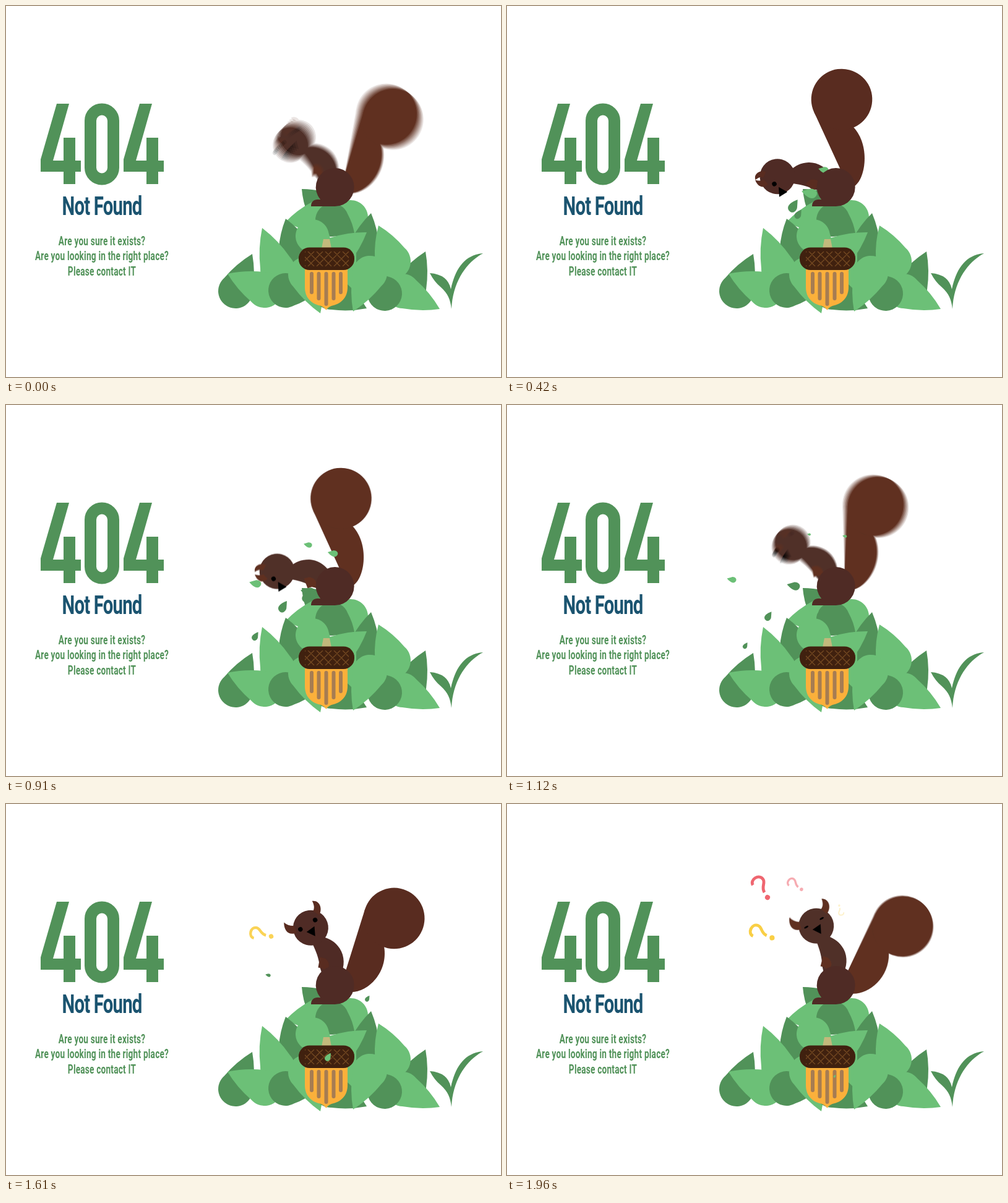
Animation of 800x600 px, one loop 2.03 s. Source, as an HTML page with a canvas:

```html
<!DOCTYPE html>
<html lang="en">
<head>
<meta charset="utf-8">
<title>404 Not Found</title>
<style>
html, body { margin: 0; width: 100%; height: 100%; overflow: hidden; background: #fff; }
svg, canvas { position: absolute; left: 0; top: 0; width: 800px; height: 600px; }
text { font-family: Roboto, "Liberation Sans", sans-serif; text-anchor: middle; }
.title { font-size: 42px; font-weight: 700; letter-spacing: -1.2px; fill: #1b5470; }
.line { font-size: 19.5px; font-weight: 600; letter-spacing: .3px; fill: #519259; }
</style>
</head>
<body>
<svg viewBox="0 0 800 600">
  <defs>
    <path id="four" d="M82 158H102L76 250H93V213H112V250H121V268H112V288H93V268H56V248Z"/>
    <clipPath id="weave"><rect x="483" y="397" width="71" height="24"/></clipPath>
  </defs>

  <g fill="#519259" role="img" aria-label="404">
    <use href="#four"/>
    <use href="#four" x="134"/>
    <rect x="136.5" y="167" width="37" height="113" rx="18.5" fill="none" stroke="#519259" stroke-width="19"/>
  </g>
  <g transform="translate(155 0) scale(.7 1)">
    <text class="title" y="338">Not Found</text>
    <text class="line" y="387">Are you sure it exists?</text>
    <text class="line" y="411.5">Are you looking in the right place?</text>
    <text class="line" y="436">Please contact IT</text>
  </g>

  <g id="pile"></g>

  <!-- acorn -->
  <path fill="#c2b97c" d="M513 377H523L526 392H510Z"/>
  <path fill="#fbb03b" d="M483 426H552V455C552 472 541 482 526 485Q519 488 517.5 492Q515 488 509 485C494 482 483 472 483 455Z"/>
  <path stroke="#a67c52" stroke-width="6" stroke-linecap="round" d="M494 433V463M505.5 433V473M517.5 433V482M529.5 433V473M541 433V463"/>
  <rect x="473" y="390.5" width="90" height="36.5" rx="17.5" fill="#40210f"/>
  <path id="hatch" clip-path="url(#weave)" stroke="#754a22" stroke-width="1.3"/>

  <path fill="#519259" d="M720 490C718 474 714 465 703 455Q692 446 685 432Q714 434 719 458C726 424 742 402 771 400C746 413 722 444 720 490Z"/>
</svg>
<canvas id="stage" width="800" height="600"></canvas>

<script>
const FRAME = 70, COUNT = 29, BLUR = 8, SHUTTER = 0.4;
const BODY = '#4f2b25', FUR = '#592c20', DARK = '#519259', LIGHT = '#6cc077';
const YELLOW = '#f9cf45', RED = '#ef6670';
const HIP = [531, 290], TAIL_ROOT = [540, 280], PAW = [490, 302];

const rad = deg => deg * Math.PI / 180;
const mix = (a, b, k) => a + (b - a) * k;
const clamp = v => Math.max(0, Math.min(1, v));
const span = (t, from, length) => clamp((t - from) / length);
const smooth = u => u * u * (3 - 2 * u);
const easeOut = (u, power) => 1 - (1 - u) ** power;

// a pile leaf: a round end and two slightly bowed sides meeting in a tip
function leafPath(tipX, tipY, x, y, r = 28) {
  const turn = Math.atan2(tipY - y, tipX - x);
  const open = Math.acos(r / Math.hypot(tipX - x, tipY - y));
  const touch = side => [x + r * Math.cos(turn + side * open), y + r * Math.sin(turn + side * open)];
  const bow = side => {
    const [px, py] = touch(side), out = turn + side * open, len = Math.hypot(tipX - px, tipY - py);
    return [(px + tipX) / 2 + .08 * len * Math.cos(out), (py + tipY) / 2 + .08 * len * Math.sin(out)];
  };
  return `M${tipX} ${tipY}Q${bow(1)} ${touch(1)}A${r} ${r} 0 1 1 ${touch(-1)}Q${bow(-1)} ${tipX} ${tipY}Z`;
}

const pile = [];
const grow = (color, ...leaf) => pile.push(`<path fill="${color}" d="${leafPath(...leaf)}"/>`);
grow(DARK, 478, 296, 515, 330);
grow(LIGHT, 452, 349, 510, 340);
grow(LIGHT, 560, 400, 557, 342);
grow(DARK, 563, 367, 527, 346, 27);
grow(DARK, 452, 344, 468, 400);
grow(DARK, 590, 335, 578, 395, 26);
grow(LIGHT, 530, 420, 495, 372, 27);
grow(LIGHT, 583, 366, 530, 402);
pile.push(`<path fill="${LIGHT}" d="M490 400H566V458H490Z"/>`);
grow(DARK, 398, 401, 371, 461);
grow(LIGHT, 414, 359, 439, 426);
grow(LIGHT, 358, 433, 418, 459, 29);
grow(DARK, 500, 465, 452, 460);
grow(LIGHT, 508, 497, 484, 434);
grow(DARK, 583, 489, 525, 463);
grow(DARK, 678, 397, 651, 459);
grow(LIGHT, 701, 490, 641, 461);
grow(LIGHT, 602, 355, 625, 413, 29);
grow(DARK, 578, 430, 612, 465);
grow(LIGHT, 561, 494, 588, 432);
document.getElementById('pile').innerHTML = pile.join('');

let hatch = '';
for (let x = 460; x < 570; x += 14) hatch += `M${x} 397l24 24M${x + 10} 397l-24 24`;
document.getElementById('hatch').setAttribute('d', hatch);

// dive into the leaves, dig, rise again, then slowly lean back
function pose(t) {
  const u = span(t, -1, 4), rise = smooth(span(t, 12.6, 5.6)), lean = span(t, 18, 10);
  const dive = easeOut(u, 2.3);
  const dig = dive * (1 - rise) * (1 - Math.cos(1.346 * (t - 6)));
  return {
    head: 108.4 + 63 * dive - 54.4 * rise - 8.6 * lean ** 1.2 - 2 * dig,
    tail: 38.8 + 50.7 * easeOut(u, 1.3) - 41.5 * rise - 9.2 * lean ** 4,
    paw: 12 * dig,
    eyes: clamp(.35 + (28 - t) * .25)
  };
}

// leaves thrown from the paws: colour, birth, life, direction, reach
const flying = [
  [LIGHT, 8, 14, 189, 172],
  [DARK, 9, 14, 149, 117],
  [DARK, 3.5, 17, 140, 155],
  [DARK, 3.5, 5, 118, 60],
  [DARK, 13, 12, 201, 75],
  [DARK, 12, 4, 110, 25],
  [LIGHT, 6, 11, 269, 95],
  [LIGHT, 4, 4, 301, 65],
  [LIGHT, 9, 8, 302, 110],
  [DARK, 14, 12, 8, 107],
  [LIGHT, 14, 15, 74, 146]
];

// question marks: colour, birth, resting place, turn, size
const marks = [
  [YELLOW, 19.5, 411, 209, -67, 1.05],
  [RED, 23, 411, 135, -32, 1.05],
  [RED, 24, 465, 130, -50, .75],
  [YELLOW, 25.5, 537, 168, 195, .6]
];

const shape = d => new Path2D(d);
const TORSO = shape('M492 229C498 240 503 250 506 266L516 292L540 275C546 262 545 245 536 233C528 223 520 219 508 216Z');
const ARM = shape('M505 249L514 251C522 257 522 266 516 272L510 267L503 266Z');
const HAUNCH = shape('M493 324C493 315 499 312 508 313A31 31 0 1 1 531 324Z');
const EAR_L = shape('M-43 -15Q-37 -8 -27 -7L-24 5C-38 9 -45 -1 -43 -15Z');
const EAR_R = shape('M9 -44C22 -44 25 -28 17 -19L8 -27C12 -32 11 -38 9 -44Z');
const DROP = shape('M.6 -.22C.2 -.38 -.5 -.5 -.5 .05C-.5 .42 0 .45 .2 .2Q.4 0 .6 -.22Z');
const HOOK = shape('M-9 -10C-9 -20 9 -20 9 -9C9 -2 0 -1 0 9');

function layer() {
  const c = document.createElement('canvas');
  c.width = 800; c.height = 600;
  return c.getContext('2d');
}
const stage = document.getElementById('stage').getContext('2d');
const sample = layer(), smear = layer();

function put(c, path, color) { c.fillStyle = color; c.fill(path); }
function disc(c, x, y, r, color, squash = 1) {
  c.fillStyle = color;
  c.beginPath(); c.ellipse(x, y, r, r * squash, rad(-30), 0, 7); c.fill();
}
function turned(c, [x, y], deg, draw) {
  c.save();
  c.translate(x, y); c.rotate(rad(deg)); c.translate(-x, -y);
  draw();
  c.restore();
}
// draws in a local frame placed at x, y
function placed(c, x, y, deg, size, draw) {
  c.save();
  c.translate(x, y); c.rotate(rad(deg)); c.scale(size, size);
  draw();
  c.restore();
}

function drawHead(c, angle, eyes) {
  const q = clamp((angle - 108.4) / 63), e = smooth(q), bow = Math.sin(Math.PI * q) ** 2;
  const reach = mix(98, 95, q), a = rad(angle);
  const face = (x0, y0, x1, y1) => [mix(x0, x1, e) - 14 * bow, mix(y0, y1, e) + 6 * bow];
  placed(c, HIP[0] + reach * Math.cos(a), HIP[1] - reach * Math.sin(a), 0, 1, () => {
    disc(c, 0, 0, 28.5, BODY);
    const earSize = 1 - .2 * q - .3 * bow;
    placed(c, 0, 0, -28 * Math.sqrt(q), earSize, () => put(c, EAR_L, FUR));
    placed(c, 0, 0, -110 * q, earSize, () => put(c, EAR_R, FUR));
    disc(c, ...face(-16, 2, -5, 12), 3.7, '#000', eyes);
    c.globalAlpha = clamp(2 - 4 * q);
    disc(c, mix(9, -14, q), mix(-12, -20, q), 3.7, '#000', eyes);
    c.globalAlpha = 1;
    c.beginPath();
    c.lineTo(...face(-6, 6, 3, 33));
    c.lineTo(...face(7, -3, 2, 17));
    c.lineTo(...face(8, 13, 16, 25));
    c.fillStyle = '#000';
    c.fill();
  });
}

function drawSquirrel(c, t) {
  const { head, tail, paw, eyes } = pose(t);
  turned(c, TAIL_ROOT, 89.5 - tail, () => {
    const k = 9 * clamp((89.5 - tail) / 42);
    put(c, shape(`M496 171L547 282L562 291C${580 + k} 278 ${587 + k} 225 560 196Z`), FUR);
    disc(c, 541, 151, 49.3, FUR);
  });
  turned(c, HIP, 116.6 - head, () => {
    put(c, TORSO, BODY);
    turned(c, [514, 252], paw, () => put(c, ARM, FUR));
  });
  drawHead(c, head, eyes);
}

// averages several moments of the shutter time
function drawBlurred(t) {
  smear.globalCompositeOperation = 'source-over';
  smear.clearRect(0, 0, 800, 600);
  smear.globalCompositeOperation = 'lighter';
  smear.globalAlpha = 1 / BLUR;
  for (let i = 0; i < BLUR; i++) {
    sample.clearRect(0, 0, 800, 600);
    drawSquirrel(sample, t - SHUTTER * i / (BLUR - 1));
    smear.drawImage(sample.canvas, 0, 0);
  }
  stage.drawImage(smear.canvas, 0, 0);
}

function drawLeaf([color, birth, life, angle, reach], t) {
  const u = (t - birth) / life;
  if (u < 0 || u >= 1) return;
  const far = reach * easeOut(u, 1.6), dx = Math.cos(rad(angle)), dy = Math.sin(rad(angle));
  const tip = dy < 0 ? 210 : -40;
  placed(stage, PAW[0] + far * dx, PAW[1] + far * dy, tip, 22 * (1 - u) ** .6, () => put(stage, DROP, color));
}

function drawMark([color, birth, x, y, turn, size], t) {
  const e = easeOut(span(t, birth, 5), 2), rest = 1 - e;
  placed(stage, x + 8 * rest, y + 16 * rest, turn - 120 * rest, size * e, () => {
    stage.globalAlpha = clamp(size * size) * e;
    stage.strokeStyle = color;
    stage.lineWidth = 4.6;
    stage.stroke(HOOK);
    disc(stage, 0, 18, 3.9, color);
  });
}

function render(t) {
  stage.clearRect(0, 0, 800, 600);
  const now = pose(t), before = pose(t - SHUTTER);
  const speed = Math.max(Math.abs(now.head - before.head), Math.abs(now.tail - before.tail));
  if (speed > .9) drawBlurred(t);
  else drawSquirrel(stage, t);
  flying.forEach(leaf => drawLeaf(leaf, t));
  put(stage, HAUNCH, BODY);
  marks.forEach(mark => drawMark(mark, t));
}

const start = performance.now();
let shown = -1;
function tick() {
  const frame = Math.floor((performance.now() - start) / FRAME) % COUNT;
  if (frame !== shown) render(shown = frame);
  requestAnimationFrame(tick);
}
tick();
</script>
</body>
</html>
```
